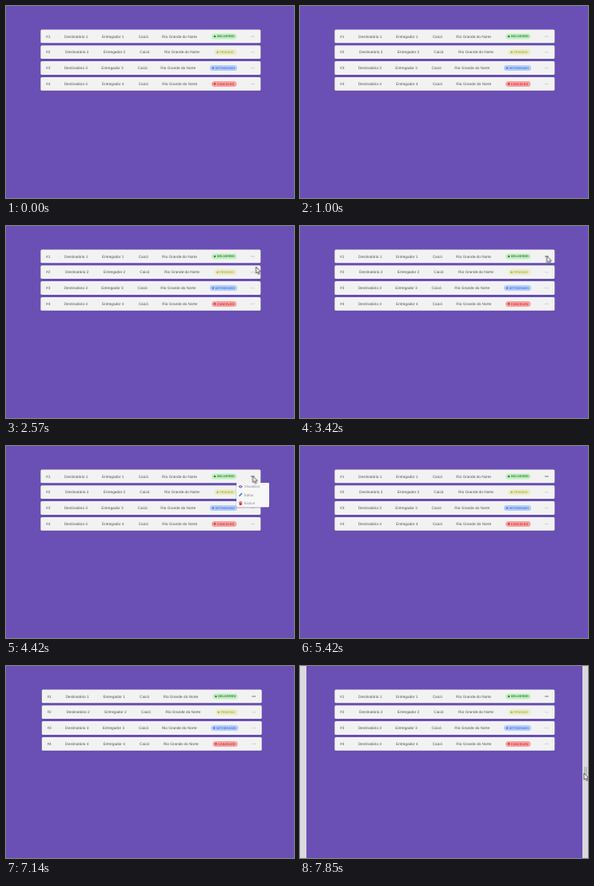
Write an HTML page that moves like this. It is 360 px wide and 240 px high and loops after 7.99 s.

```html
<!DOCTYPE html>
<html lang="pt-BR">
<head>
<meta charset="utf-8">
<title>Encomendas</title>
<style>
  html, body { margin: 0; height: 100%; overflow: hidden; background: #6a50b5; }
  svg { display: block; width: 100vw; height: 100vh; }
  text { font: 4.75px "Liberation Sans", Arial, sans-serif; fill: #555; text-rendering: geometricPrecision; }
  .status { font-size: 3.85px; font-weight: bold; }
  .card { fill: #f2f2f2; }
  .shade { fill: #4f3a8f; opacity: .4; }
  .dots { fill: #c4c4c4; }
  .menu text { font-size: 4.5px; fill: #8a8a92; }

  #list, #cursor, #menu, #edges, #left, #right, #row1 .dots {
    animation: 7.99s step-end infinite;
  }
  #list { animation-name: shift; }
  #cursor { animation-name: point; visibility: hidden; }
  #menu { animation-name: open; visibility: hidden; }
  #edges { animation-name: frame; visibility: hidden; }
  #left { animation-name: left; }
  #right { animation-name: right; }
  #row1 .dots { animation-name: focus; }

  @keyframes shift {
    0%, 94.74% { transform: none; }
    82.22% { transform: translateX(1.4px); }
  }
  @keyframes point {
    0% { visibility: hidden; transform: translate(342px, 118px); }
    21.4% { visibility: visible; transform: translate(342px, 118px); }
    23.15% { visibility: visible; transform: translate(335px, 101px); }
    25.03% { visibility: visible; transform: translate(328px, 85px); }
    26.78% { visibility: visible; transform: translate(322px, 72px); }
    28.53% { visibility: visible; transform: translate(317px, 61px); }
    30.28% { visibility: visible; transform: translate(314px, 54px); }
    32.16% { visibility: visible; transform: translate(312.5px, 51px); }
    33.91% { visibility: visible; transform: translate(312px, 48px); }
    35.66% { visibility: visible; transform: translate(311px, 43px); }
    37.54% { visibility: visible; transform: translate(309.5px, 39px); }
    39.29% { visibility: visible; transform: translate(308.5px, 37.5px); }
    60.7% { visibility: visible; transform: translate(311px, 41px); }
    62.57% { visibility: visible; transform: translate(315px, 55px); }
    64.33% { visibility: visible; transform: translate(319px, 78px); }
    66.08% { visibility: hidden; transform: translate(319px, 100px); }
    94.74% { visibility: visible; transform: translate(355px, 134px); }
    100% { visibility: visible; transform: translate(355px, 134px); }
  }
  @keyframes open {
    0%, 62.57% { visibility: hidden; }
    48.18% { visibility: visible; }
  }
  @keyframes frame {
    0% { visibility: hidden; }
    94.74%, 100% { visibility: visible; }
  }
  @keyframes left {
    0% { transform: translateX(-4px); }
    96.49% { transform: translateX(-2px); }
    98.24%, 100% { transform: none; }
  }
  @keyframes right {
    0% { transform: translateX(4px); }
    96.49% { transform: translateX(2px); }
    98.24%, 100% { transform: none; }
  }
  @keyframes focus {
    0% { fill: #c4c4c4; }
    39.29%, 100% { fill: #666; }
  }
</style>
</head>
<body>
<svg viewBox="0 0 360 240" preserveAspectRatio="none">
  <rect width="360" height="240" fill="#6a50b5"/>
  <g id="list"></g>

  <g id="menu" class="menu">
    <rect class="shade" x="287.6" y="46" width="42" height="31.4" rx="1.5"/>
    <path d="M288 47q0-1 1-1h17.5l2-2 2 2H328q1 0 1 1v28.500q0 1-1 1H289q-1 0-1-1z" fill="#f7f7f8"/>
    <path d="M290.600 50.700q2.600-3.400 5.200 0q-2.600 3.400-5.200 0z" fill="#7159c1"/>
    <circle cx="293.200" cy="50.700" r=".8" fill="#f7f7f8"/>
    <path d="M291 63.200l.4-1.700 3-3 1.300 1.300-3 3z" fill="#4d85ee"/>
    <path d="M291 69.800h4.400v.8H291zM292.400 69.200h1.600v.6h-1.600zM291.400 71h3.600l-.3 3h-3z" fill="#de3b3b"/>
    <text x="297.800" y="52.300">Visualizar</text>
    <text x="297.800" y="62.700">Editar</text>
    <text x="297.800" y="73.300">Excluir</text>
  </g>

  <g id="edges">
    <rect id="left" x="-1" width="9" height="240" fill="#dad9de"/>
    <g id="right">
      <rect x="353" width="12" height="240" fill="#dad9de"/>
      <path d="M356 126v10M358 126v10" stroke="#7fa578" stroke-width=".8"/>
    </g>
  </g>

  <path id="cursor" d="M0 0V8.200L1.900 6.500 3.200 9.400 4.600 8.800 3.400 6H5.900Z"
        fill="#f4f2f8" stroke="#38333f" stroke-width=".8" stroke-linejoin="round"/>
</svg>

<script>
  const NS = "http://www.w3.org/2000/svg";
  const add = (parent, tag, attrs, text = "") => {
    const el = document.createElementNS(NS, tag);
    for (const key in attrs) el.setAttribute(key, attrs[key]);
    el.textContent = text;
    return parent.appendChild(el);
  };

  // Column starts, then status pill: left, right, label, tint, ink
  const rows = [
    { cols: [73, 120, 165.7, 195], pill: [257, 288.3, "DELIVERED", "#c3eec3", "#2c8a35"] },
    { cols: [74, 121.8, 167.3, 198], pill: [260.500, 288.3, "PENDING", "#eaebc6", "#b9b54a"] },
    { cols: [72.700, 119.300, 164.500, 193.300], pill: [254.800, 289, "WITHDRAWN", "#b5cdfb", "#4d7fe0"] },
    { cols: [72.700, 120, 165.700, 195.300], pill: [257, 288.300, "CANCELED", "#f8a3a3", "#d63a3f"] }
  ];

  rows.forEach(({ cols, pill: [x1, x2, label, tint, ink] }, i) => {
    const n = i + 1, y = 29.500 + i * 19.800;
    const row = add(list, "g", { id: "row" + n });
    const box = { x: 43.300, width: 275, height: 16.800, rx: 1.500 };
    add(row, "rect", { ...box, y: y + .7, class: "shade" });
    add(row, "rect", { ...box, y, class: "card" });

    const words = ["#" + n, "Destinatário " + n, "Entregador " + n, "Caicó", "Rio Grande do Norte"];
    words.forEach((word, k) => add(row, "text", { x: [50, ...cols][k], y: y + 10 }, word));

    add(row, "rect", { x: x1, y: y + 5, width: x2 - x1, height: 7, rx: 3.500, fill: tint });
    add(row, "circle", { cx: x1 + 4, cy: y + 8.500, r: 1.300, fill: ink });
    add(row, "text", { x: x1 + 6.800, y: y + 9.900, class: "status", style: "fill:" + ink }, label);

    const dots = add(row, "g", { class: "dots" });
    for (const dx of [-1.600, 0, 1.600]) add(dots, "circle", { cx: 308.300 + dx, cy: y + 8.500, r: .65 });
  });
</script>
</body>
</html>
```
